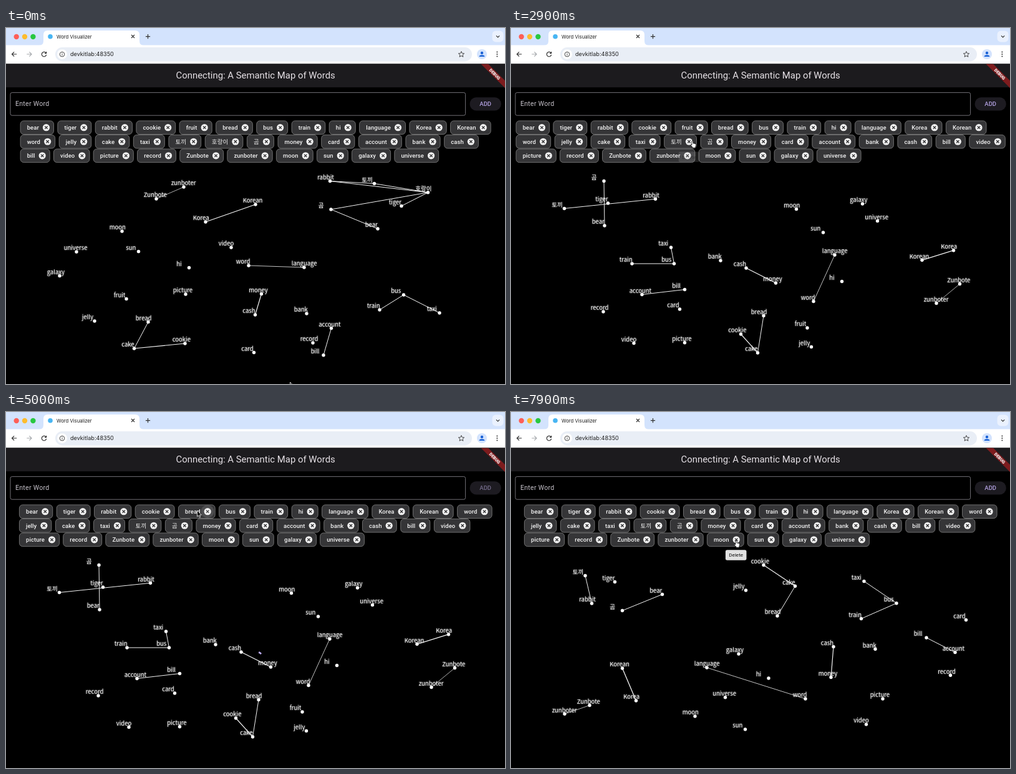
An HTML page that plays this animation: 800x571 px, repeating every 8000 ms.

```html
<!DOCTYPE html>
<html lang="en">
<head>
<meta charset="utf-8">
<title>Word Visualizer</title>
<style>
html, body { margin: 0; width: 100%; height: 100%; overflow: hidden; background: #000; }
svg { display: block; width: 100%; height: 100%; }
text { font-family: Roboto, "Noto Sans CJK KR", "Noto Sans CJK", sans-serif; white-space: pre; }
.ui { font-family: Inter, "Open Sans", sans-serif; fill: #1f1f1f; }
.chip text { font-size: 9.5px; font-weight: 500; letter-spacing: .06px; fill: #f2f2f2; }
.chip rect { fill: #353537; stroke: #858585; stroke-width: .8; }
.chip circle { fill: #f1f1f1; }
.chip path { stroke: #303032; stroke-width: 1.3; }
.graph line { stroke: #f4f4f4; }
.graph circle { fill: #fff; }
.graph .names { filter: drop-shadow(0 0 1.3px rgba(255,255,255,.5)); }
.graph text { font: 9.5px "Noto Sans CJK KR", "Noto Sans CJK", "Noto Sans", sans-serif; fill: #fff; }
.icon { fill: none; stroke: #333; stroke-width: 1.2; }
</style>
</head>
<body>
<svg id="stage" viewBox="0 0 800 571">
  <rect width="800" height="571"/>

  <!-- browser frame -->
  <rect width="800" height="29" fill="#d3e3fd"/>
  <rect y="27.5" width="800" height="30" fill="#fff"/>
  <path d="M53 28Q60 28 60 21V11Q60 4 67 4H207Q214 4 214 11V21Q214 28 221 28Z" fill="#fff"/>
  <circle cx="16.7" cy="14" r="4.2" fill="#fe5f57"/>
  <circle cx="30" cy="14" r="4.2" fill="#febc2e"/>
  <circle cx="43.4" cy="14" r="4.2" fill="#28c840"/>
  <circle cx="71" cy="13.7" r="3.8" fill="#47b5f3"/>
  <text class="ui" x="81" y="16.5" font-size="7.7">Word Visualizer</text>
  <path class="icon" d="M201 11l5 5m0-5l-5 5M227.5 10v7.2m-3.6-3.6h7.2"/>
  <rect x="779.5" y="4.5" width="18" height="18" rx="6" fill="#eaf1fe"/>
  <path class="icon" d="M786 12.3l2.6 2.6 2.6-2.6"/>
  <rect x="79" y="31" width="668" height="22.4" rx="11.2" fill="#e9eef6"/>
  <circle cx="90" cy="42.2" r="8" fill="#fff"/>
  <circle class="icon" cx="90" cy="42.2" r="3.8" style="stroke-width:.9"/>
  <path class="icon" d="M90 41.6v2.4M90 40v.9" style="stroke-width:.9"/>
  <text class="ui" x="103" y="45.4" font-size="9.1">devkitlab:48350</text>
  <path class="icon" d="M17.2 42H9.6m3.5-3.6L9.5 42l3.6 3.6"/>
  <path class="icon" d="M33.3 42h7.6m-3.5-3.6L41 42l-3.6 3.6" style="stroke:#a5a8ac"/>
  <path class="icon" d="M64 40a3.7 3.7 0 1 0 .6 3M64.6 38v2.6H62"/>
  <path class="icon" d="M730 37.6l1.3 3 3.3.3-2.5 2.2.8 3.2-2.9-1.7-2.9 1.7.8-3.2-2.5-2.2 3.3-.3Z" style="stroke-width:.9"/>
  <circle cx="763" cy="42" r="8" fill="#d3e3fd"/>
  <path d="M758.7 46v-.7q.7-2 4.3-2t4.3 2v.7Z" fill="#1a62d6"/>
  <circle cx="763" cy="40" r="2.2" fill="#1a62d6"/>
  <g fill="#333"><circle cx="787.4" cy="38.6" r="1"/><circle cx="787.4" cy="42" r="1"/><circle cx="787.4" cy="45.4" r="1"/></g>

  <!-- app header -->
  <rect y="57.5" width="800" height="37.7" fill="#1c1b1e"/>
  <text x="400.2" y="81.3" font-size="14.9" text-anchor="middle" fill="#e6e1e6">Connecting: A Semantic Map of Words</text>
  <clipPath id="page"><rect y="57.7" width="800" height="513.3"/></clipPath>
  <g clip-path="url(#page)">
    <g transform="translate(800 57.7) rotate(45)">
      <rect x="-27.2" y="19" width="54.4" height="8.2" fill="#7d1c1e"/>
      <text y="25.5" font-size="6.8" font-weight="900" text-anchor="middle" fill="#fff">DEBUG</text>
    </g>
  </g>
  <rect x="7" y="103.6" width="729.6" height="36.6" rx="2.7" fill="none" stroke="#8f8c93" stroke-width=".8"/>
  <text x="15" y="125.2" font-size="10.6" letter-spacing=".25" fill="#c6c2ca">Enter Word</text>
  <rect x="743.6" y="111.2" width="50.2" height="21.3" rx="10.6" fill="#1d1b21"/>
  <text id="add" x="768.7" y="125.4" font-size="9.5" font-weight="500" text-anchor="middle">ADD</text>

  <g id="graphs"></g>
  <g id="chips"></g>
  <circle id="ripple" r="10.5" fill="#fff"/>
  <path id="spinner" fill="none" stroke="#b9aaf0" stroke-width="2.7"/>
  <g id="tip">
    <rect x="-16.8" y="-8.2" width="33.6" height="16.4" rx="2.7" fill="#e2e2e2"/>
    <text y="2.9" font-size="8.1" text-anchor="middle" fill="#111">Delete</text>
  </g>
  <path id="arrow" d="M0 0V9.8L2.2 7.7 3.7 11.2 5.3 10.5 3.8 7.1H6.9Z" fill="#000" stroke="#fff" stroke-width=".8"/>
  <path id="hand" d="M-1.1 1.1Q-1.1 0 0 0T1.1 1.1V4Q4.4 4 5.6 5.2 6.2 7.2 4.9 9.4V11.2H-.2V10L-3.3 6.9Q-3.4 5.5-1.1 6.6Z" fill="#fff" stroke="#000" stroke-width=".8"/>
</svg>
<script>
const LOOP = 8000, STEP = 100;
const $ = id => document.getElementById(id);

function el(tag, attrs, parent, text) {
  const node = document.createElementNS("http://www.w3.org/2000/svg", tag);
  for (const key in attrs) node.setAttribute(key, attrs[key]);
  if (text) node.textContent = text;
  parent.append(node);
  return node;
}

// ---- chips ----
const WORDS = ("bear tiger rabbit cookie fruit bread bus train hi language Korea Korean " +
  "word jelly cake taxi 토끼 호랑이 곰 money card account bank cash " +
  "bill video picture record Zunbote zunboter moon sun galaxy universe").split(" ");
const LAYOUTS = [
  { from: 0, gone: [], left: 22.7, rows: [[12, 777.6], [12, 757.8], [10, 694]] },
  { from: 1700, gone: ["호랑이"], left: 7.7, rows: [[12, 762.4], [13, 792.7], [8, 561.5]] },
  { from: 4900, gone: ["호랑이", "fruit"], left: 21, rows: [[12, 779.5], [12, 744.3], [8, 574.8]] }
];
const pen = document.createElement("canvas").getContext("2d");
pen.font = '500 9.5px Roboto, "Noto Sans CJK KR", "Noto Sans CJK", sans-serif';
const chipWidth = word => pen.measureText(word).width + word.length * .06 + 35;

function drawChip(word, x, y, width, parent) {
  const g = el("g", { transform: `translate(${x} ${y})`, class: "chip" }, parent);
  el("rect", { x: .4, y: -10.8, width: width - .8, height: 21.6, rx: 5.3 }, g);
  el("text", { x: 11, y: 3.3 }, g, word);
  el("circle", { cx: width - 12.4, r: 5.6 }, g);
  el("path", { d: `M${width - 14.6} -2.2l4.4 4.4m0-4.4l-4.4 4.4` }, g);
}

for (const layout of LAYOUTS) {
  layout.node = el("g", {}, $("chips"));
  const words = WORDS.filter(w => !layout.gone.includes(w));
  layout.rows.forEach(([count, right], i) => {
    const row = words.splice(0, count), widths = row.map(chipWidth);
    const used = widths.reduce((a, b) => a + b);
    const gap = (right - layout.left - used) / (count - 1);
    let x = layout.left;
    row.forEach((word, k) => {
      drawChip(word, x, 159.7 + i * 22.55, widths[k], layout.node);
      x += widths[k] + gap;
    });
  });
}

// ---- word maps ----
const PAIRS = "Korea-Korean Zunbote-zunboter word-language money-cash account-bill bread-cake cake-cookie bus-train bus-taxi 곰-bear";
const THICK = { "Korea-Korean": 1.3, "money-cash": 1.2, "cake-cookie": 1.2, "Zunbote-zunboter": .7, "word-language": .8 };
const GRAPHS = [
  { from: 0, pairs: " rabbit-토끼 rabbit-호랑이 토끼-호랑이 tiger-호랑이 곰-호랑이", dots: {
    zunboter: [285, 255], Zunbote: [241, 274], Korean: [400, 283], Korea: [320, 311],
    rabbit: [519.5, 245.5], 토끼: [590.5, 249.5], 호랑이: [676.5, 263.8], tiger: [634, 285.5],
    곰: [521, 291], bear: [596, 322], moon: [186, 326], universe: [113, 359], sun: [212.5, 358.5],
    video: [361, 352], hi: [293.5, 384.5], galaxy: [86, 397.5], word: [389, 381], language: [478, 384],
    fruit: [193, 434.5], picture: [288, 427], money: [409.5, 426.5], cash: [399.5, 460], bank: [482, 458],
    train: [599, 452], bus: [637.5, 428], taxi: [695, 457], jelly: [142, 470], bread: [228, 471.5],
    cake: [205.5, 514], cookie: [287, 506], card: [397.5, 520.5], record: [492, 505],
    account: [521.5, 481.5], bill: [509, 524.7] } },
  { from: 2600, pairs: " 토끼-rabbit", dots: {
    곰: [149, 245.5], tiger: [155.5, 281], 토끼: [85.5, 289.5], rabbit: [231.5, 274.3], bear: [150, 317],
    taxi: [256.5, 352], train: [194, 378], bus: [261.5, 378], bank: [336, 373], cash: [377, 385],
    money: [424.5, 409], account: [210, 427.5], bill: [278.5, 419.5], record: [148, 455], card: [270.5, 451],
    video: [197, 505.5], picture: [278.5, 504.7], bread: [405, 461.5], cookie: [368.5, 491], cake: [395.5, 521],
    fruit: [475, 481], jelly: [481.5, 511.5], word: [485, 438.5], hi: [530.5, 406.5], language: [519, 364],
    sun: [500.5, 328], moon: [457.5, 290.5], galaxy: [563.5, 282], universe: [587.5, 309.5],
    Korean: [659, 372.3], Korea: [709.5, 356.7], Zunbote: [719.5, 410.5], zunboter: [682, 441.5] } },
  { from: 5200, pairs: " 토끼-rabbit", dots: {
    토끼: [119, 262.5], tiger: [166.5, 272.5], rabbit: [129.5, 307], 곰: [178.5, 318.5], bear: [242.5, 292.5],
    cookie: [405, 245.5], jelly: [376.5, 286], cake: [455.5, 279.3], bread: [427, 327], taxi: [566, 271.5],
    bus: [618, 306.7], train: [561.5, 331.5], card: [729.5, 333.5], bill: [666, 362], account: [712, 385.5],
    record: [704.5, 422.3], bank: [584, 380.3], cash: [517, 376.5], money: [513, 425.5], galaxy: [365, 388],
    language: [314, 410], hi: [413, 427], word: [472, 460], universe: [343.5, 457.7], moon: [295, 488],
    sun: [375.5, 509], picture: [596, 460], video: [569.5, 501], Korean: [178.5, 411], Korea: [200.5, 463],
    Zunbote: [126, 470.5], zunboter: [86, 484.3] } }
];

for (const graph of GRAPHS) {
  graph.node = el("g", { class: "graph" }, $("graphs"));
  for (const pair of (PAIRS + graph.pairs).split(" ")) {
    const [a, b] = pair.split("-").map(w => graph.dots[w]);
    el("line", { x1: a[0], y1: a[1], x2: b[0], y2: b[1], "stroke-width": THICK[pair] || 1 }, graph.node);
  }
  const names = el("g", { class: "names" }, graph.node);
  for (const word in graph.dots) {
    const [x, y] = graph.dots[word];
    el("circle", { cx: x, cy: y, r: 2.7 }, graph.node);
    el("text", { x: x - 20.3, y: y - 2.6 }, names, word);
  }
}

// ---- motion tables ----
// time, x, y of the pointer
const PATH = [
  [0, 455.5, 568], [100, 455, 545], [500, 440, 412], [700, 440, 412], [900, 416, 212], [1000, 412, 203],
  [1100, 382, 188], [1200, 369, 180], [1700, 367, 179], [1900, 369, 178], [2600, 369, 178],
  [2900, 291, 181], [3200, 290, 181], [3400, 294, 172], [3700, 303, 157], [4800, 303, 157],
  [5000, 306.5, 158], [5200, 308, 180], [5600, 345, 490], [5900, 325, 470], [6100, 315, 448],
  [6400, 362, 216], [6500, 364, 210], [6800, 361, 206], [8000, 361, 206]
];
// from, until, x, y of each hovered delete button
const HOVERS = [
  [900, 1050, 414.5, 205], [1200, 1700, 368, 182.3], [2900, 3250, 285.5, 182.3],
  [3650, 4900, 302.3, 159.7], [6400, 8000, 360.7, 205]
];
// from, until, and the button that keeps the press ripple
const BUSY = [[1700, 2600, 335, 182.3], [4890, 5200, 323, 159.7]];

const clamp = v => Math.max(0, Math.min(1, v));
const show = (node, on) => node.style.display = on ? "" : "none";

function pointerAt(t) {
  const i = PATH.findIndex(p => p[0] > t);
  const a = PATH[i - 1], b = PATH[i], k = (t - a[0]) / (b[0] - a[0]);
  return [a[1] + (b[1] - a[1]) * k, a[2] + (b[2] - a[2]) * k];
}

// cubic-bezier(.4, 0, .2, 1)
function ease(x) {
  let lo = 0, hi = 1, s = .5;
  for (let i = 0; i < 20; i++) {
    s = (lo + hi) / 2;
    const at = 1.2 * s * (1 - s) ** 2 + .6 * s * s * (1 - s) + s ** 3;
    if (at < x) lo = s; else hi = s;
  }
  return 3 * s * s * (1 - s) + s ** 3;
}

function spinnerPath(ms) {
  const turn = ms / 1333 % 1;
  const head = ease(clamp(turn * 2)), tail = ease(clamp(turn * 2 - 1));
  const start = Math.PI * (-.5 + tail * 1.5 + ms / 2222 * 2 + turn * .5);
  const sweep = Math.max((head - tail) * 1.5 * Math.PI, .02);
  const at = a => `${400 + 12.2 * Math.cos(a)} ${396.3 + 12.2 * Math.sin(a)}`;
  return `M${at(start)}A12.2 12.2 0 ${sweep > Math.PI ? 1 : 0} 1 ${at(start + sweep)}`;
}

function pick(list, t) {
  const now = list.filter(s => s.from <= t).pop();
  list.forEach(s => show(s.node, s === now));
}

function draw(t) {
  pick(LAYOUTS, t);
  pick(GRAPHS, t);

  const busy = BUSY.find(b => t >= b[0] && t < b[1]);
  show($("spinner"), busy);
  if (busy) $("spinner").setAttribute("d", spinnerPath(t - busy[0]));

  let dim = 0, glow = 0;
  for (const [from, until, x, y] of BUSY) {
    dim = Math.max(dim, clamp((t - from) / 200) - clamp((t - until) / 200));
    if (t >= from && t < from + 300) {
      glow = .2 * (1 - (t - from) / 300);
      $("ripple").setAttribute("transform", `translate(${x} ${y})`);
    }
  }
  $("ripple").setAttribute("opacity", glow);
  const mix = (a, b) => Math.round(a + (b - a) * dim);
  $("add").setAttribute("fill", `rgb(${mix(180, 66)},${mix(162, 64)},${mix(226, 69)})`);

  // a tooltip lingers briefly unless its chip was removed
  let alpha = 0;
  for (const [from, until, x, y] of HOVERS) {
    const linger = BUSY.some(b => Math.abs(b[0] - until) < 20) ? 0 : 100;
    if (t >= from && t < until + linger) {
      alpha = clamp((t - from + 20) / 150);
      $("tip").setAttribute("transform", `translate(${x} ${y + 24.5})`);
    }
  }
  $("tip").setAttribute("opacity", alpha);

  const over = HOVERS.some(h => t >= h[0] && t < h[1]);
  const [x, y] = pointerAt(t);
  for (const id of ["arrow", "hand"]) {
    $(id).setAttribute("transform", `translate(${x} ${y})`);
    show($(id), over === (id === "hand"));
  }
}

const begin = performance.now();
function tick() {
  const t = (performance.now() - begin) % LOOP;
  draw(Math.floor(t / STEP) * STEP);
  requestAnimationFrame(tick);
}
tick();
</script>
</body>
</html>
```
